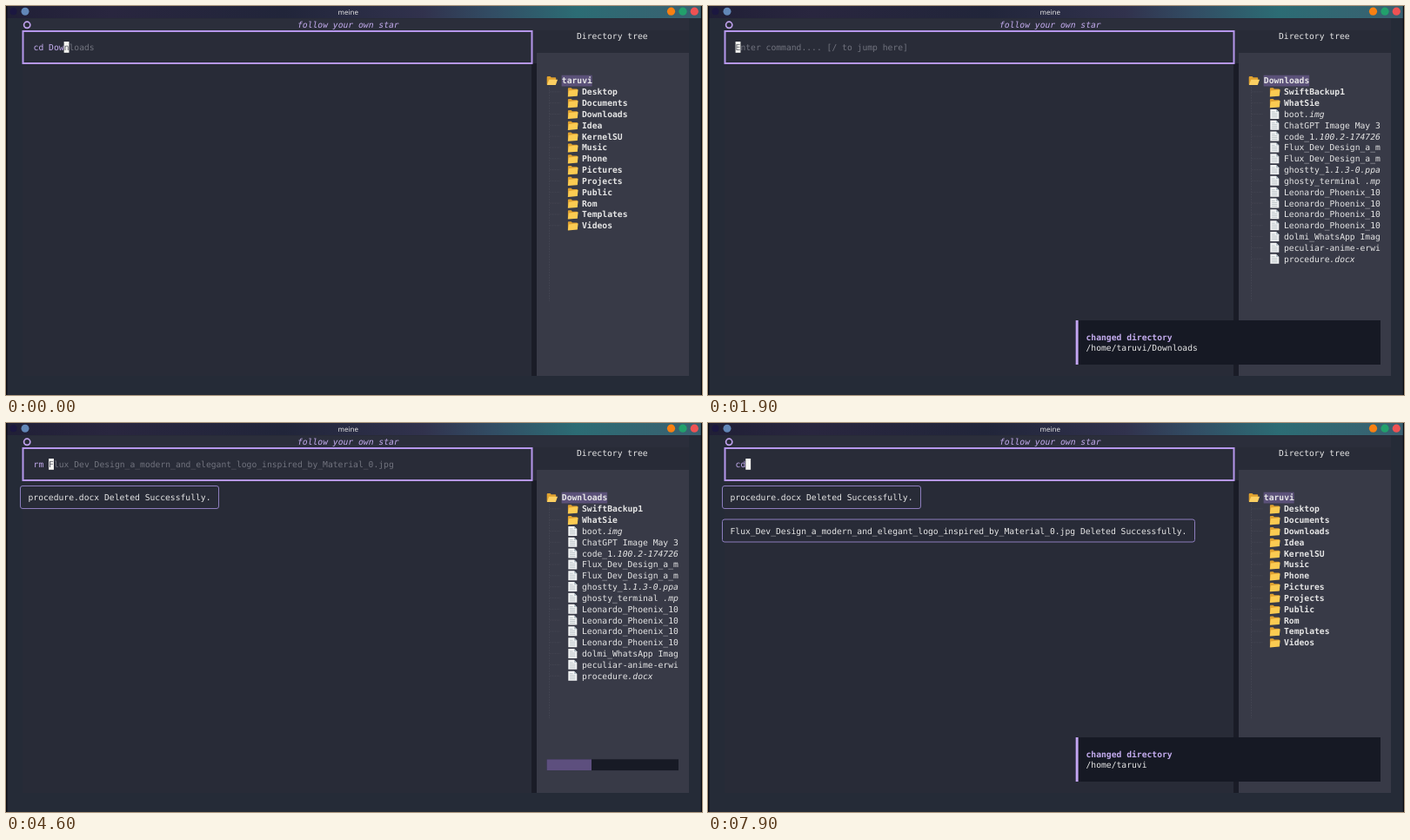
Write an HTML page that moves like this. It is 800 px wide and 448 px high and loops after 8000 ms.

```html
<!DOCTYPE html>
<html lang="en">
<head>
<meta charset="utf-8">
<title>meine</title>
<style>
  html, body { margin: 0; width: 100%; height: 100%; overflow: hidden; background: #272b37; }
  svg { display: block; width: 800px; height: 448px; }
  text {
    font: 9.7px "DejaVu Sans Mono", "Noto Sans Mono", monospace;
    fill: #e6e6e6; white-space: pre; text-rendering: geometricPrecision;
  }
  .bold { font-weight: 700; }
  .slant { font-style: italic; }
  .lilac { fill: #c5adf0; }
  .ghost { fill: #71737e; }
  .box { fill: none; stroke: #8d7dbd; }
  .guide { fill: none; stroke: #454754; stroke-width: .7; stroke-dasharray: 2 1; }
</style>
</head>
<body>
<svg viewBox="0 0 800 448">
  <defs>
    <linearGradient id="bar">
      <stop offset="0" stop-color="#201f36"/>
      <stop offset=".15" stop-color="#29263f"/>
      <stop offset=".4" stop-color="#21253a"/>
      <stop offset=".6" stop-color="#31324d"/>
      <stop offset=".7" stop-color="#324d64"/>
      <stop offset=".82" stop-color="#2c6c74"/>
      <stop offset="1" stop-color="#3a6070"/>
    </linearGradient>
    <g id="folder">
      <path d="M.6 2q0-1 1-1h2.8l1.2 1.3h5.2q.8 0 .8.8v7H.6z" fill="#dfa12f"/>
      <path d="M1.6 4.2 11.9 3q.4 0 .4.5l-.8 6.3q-.1.5-.6.6L.9 11.2q-.5 0-.4-.5z" fill="#fbcb52"/>
    </g>
    <g id="open">
      <path d="M.4 1.8q0-1 1-1h2.8l1.3 1.3h4.6q.8 0 .8.8v7.3H.4z" fill="#dfa12f"/>
      <path d="M3 4.5h9.8l-2.4 6.2H.5z" fill="#fbcf62"/>
    </g>
    <g id="file">
      <path d="M1 0h6.8L11 3.2V11H1z" fill="#f1f3f4"/>
      <path d="M7.8 0v3.2H11z" fill="#aebbc3"/>
      <path d="M2.8 3h3.5M2.8 5h6.4M2.8 7h6.4M2.8 9h6.4" stroke="#a9b3b9" stroke-width=".7"/>
    </g>
  </defs>

  <rect width="800" height="448" fill="#252b37"/>
  <rect x="19" y="14" width="766" height="412" fill="#282b37"/>
  <rect x="28" y="15" width="757" height="13" fill="#2b2e3b"/>
  <rect x="604" y="66" width="6" height="360" fill="#1a1c27"/>
  <rect x="610" y="54" width="175" height="372" fill="#383a47"/>

  <rect width="800" height="14" fill="url(#bar)"/>
  <circle cx="8.5" cy="6.2" r="4" fill="#1b1740"/>
  <circle cx="22" cy="6.2" r="4.5" fill="#6287b8"/>
  <circle cx="764.5" cy="6.2" r="4.6" fill="#f88012"/>
  <circle cx="778" cy="6.2" r="4.6" fill="#22a06b"/>
  <circle cx="791.3" cy="6.2" r="4.6" fill="#ee5253"/>
  <text x="393.3" y="9.7" text-anchor="middle" style="font:8px 'Noto Sans',sans-serif">meine</text>
  <path d="M.7 0v448M799.5 0v448" stroke="#0b0c12" stroke-width="1.4"/>

  <circle cx="24.2" cy="21.8" r="3.6" fill="none" stroke="#bfa1ed" stroke-width="1.7"/>
  <text x="335" y="25.3" class="slant lilac">follow your own star</text>
  <text x="656" y="38.2">Directory tree</text>

  <rect x="19.5" y="29" width="585" height="37" fill="#292c38" stroke="#b697ec" stroke-width="2"/>
  <text id="typed" x="31.6" y="51" class="lilac"></text>
  <rect id="cursor" y="41" width="5.84" height="12.8" fill="#f6f6f2"/>
  <text id="under" y="51" style="fill:#5a5c66"></text>
  <text id="rest" y="51" class="ghost"></text>

  <g id="done1">
    <rect x="16.5" y="72.5" width="228" height="26" rx="2.5" class="box"/>
    <text x="25.5" y="89.4">procedure.docx Deleted Successfully.</text>
  </g>
  <g id="done2">
    <rect x="16.5" y="111" width="543" height="26" rx="2.5" class="box"/>
    <text x="25.5" y="127.9">Flux_Dev_Design_a_modern_and_elegant_logo_inspired_by_Material_0.jpg Deleted Successfully.</text>
  </g>

  <g id="home"></g>
  <g id="downloads"></g>

  <g id="toast">
    <rect x="422" y="362" width="351" height="51" fill="#161924"/>
    <rect x="422.6" y="362" width="3" height="51" fill="#c3a6f2"/>
    <text x="434.5" y="384.5" class="bold lilac">changed directory</text>
    <text id="path" x="434.5" y="397.4"></text>
  </g>
</svg>
<script>
const CELL = 5.84, ROW = 12.83, LOOP = 8000;
const $ = id => document.getElementById(id);
const show = (id, on) => $(id).style.display = on ? '' : 'none';

const user = 'taruvi';
const folders = 'Desktop Documents Downloads Idea KernelSU Music Phone Pictures Projects Public Rom Templates Videos'.split(' ');
const files = ['boot.img', 'ChatGPT Image May 3', 'code_1.100.2-174726', 'Flux_Dev_Design_a_m', 'Flux_Dev_Design_a_m',
  'ghostty_1.1.3-0.ppa', 'ghosty_terminal .mp', 'Leonardo_Phoenix_10', 'Leonardo_Phoenix_10', 'Leonardo_Phoenix_10',
  'Leonardo_Phoenix_10', 'dolmi_WhatsApp Imag', 'peculiar-anime-erwi', 'procedure.docx'];

function tree(root, dirs, docs) {
  const names = [...dirs, ...docs];
  const rows = names.map((name, i) => {
    const y = 86 + (i + 1) * ROW, isDir = i < dirs.length;
    const label = isDir ? name : name.replace(/\..*/, '<tspan class="slant">$&</tspan>');
    return `<path class="guide" d="M624.5 ${y}h13"/>
      <use href="#${isDir ? 'folder' : 'file'}" x="645.3" y="${y - 5.6}"/>
      <text x="662" y="${y + 3.4}" class="${isDir ? 'bold' : ''}">${label}</text>`;
  });
  return `<path class="guide" d="M624.5 93V340"/>
    <use href="#open" x="621.3" y="80.2"/>
    <rect x="638.6" y="79.7" width="${root.length * CELL}" height="12.8" fill="#5b5179"/>
    <text x="638.8" y="89.4" class="bold">${root}</text>` + rows.join('');
}

$('home').innerHTML = tree(user, folders, []);
$('downloads').innerHTML = tree('Downloads', ['SwiftBackup1', 'WhatSie'], files) +
  `<rect x="621.5" y="387.3" width="151.5" height="12.8" fill="#171a25"/>
   <rect x="621.5" y="387.3" width="51.5" height="12.8" fill="#5d4f7e"/>`;

const hint = 'Enter command.... [/ to jump here]';
const logo = 'Flux_Dev_Design_a_modern_and_elegant_logo_inspired_by_Material_0.jpg';
// time, typed text, suggested remainder
const keys = [
  [0, 'cd Dow', 'nloads'], [100, 'cd Downloads', ''], [400, '', hint],
  [2600, 'r', ''], [2700, 'rm', ''], [2800, 'rm ', logo], [3000, 'rm p', 'rocedure.docx'],
  [3100, 'rm pr', 'ocedure.docx'], [3200, 'rm procedure.docx', ''], [3500, '', hint],
  [4300, 'r', ''], [4400, 'rm', ''], [4500, 'rm ', logo], [4900, 'rm ' + logo, ''], [5200, '', hint],
  [6500, 'c', ''], [6600, 'cd', ''], [6800, 'cd ', ''], [7000, 'cd .', ''], [7100, 'cd ..', ''], [7300, '', hint],
  [7700, 'c', ''], [7800, 'cd', '']
];

let last;
function draw(t) {
  const key = keys.findLast(k => k[0] <= t);
  if (key !== last) {
    last = key;
    const [, typed, rest] = key, x = 31.6 + typed.length * CELL;
    $('typed').textContent = typed;
    $('under').textContent = rest.slice(0, 1);
    $('rest').textContent = rest.slice(1);
    $('cursor').setAttribute('x', x);
    $('under').setAttribute('x', x);
    $('rest').setAttribute('x', x + CELL);
  }
  const away = t >= 400 && t < 7300;
  show('downloads', away);
  show('home', !away);
  show('done1', t >= 3500);
  show('done2', t >= 5200);
  show('toast', t >= 400 && t < 3500 || t >= 7300);
  $('path').textContent = '/home/' + user + (away ? '/Downloads' : '');
}

const start = performance.now();
function frame() {
  draw((performance.now() - start) % LOOP);
  requestAnimationFrame(frame);
}
frame();
</script>
</body>
</html>
```
